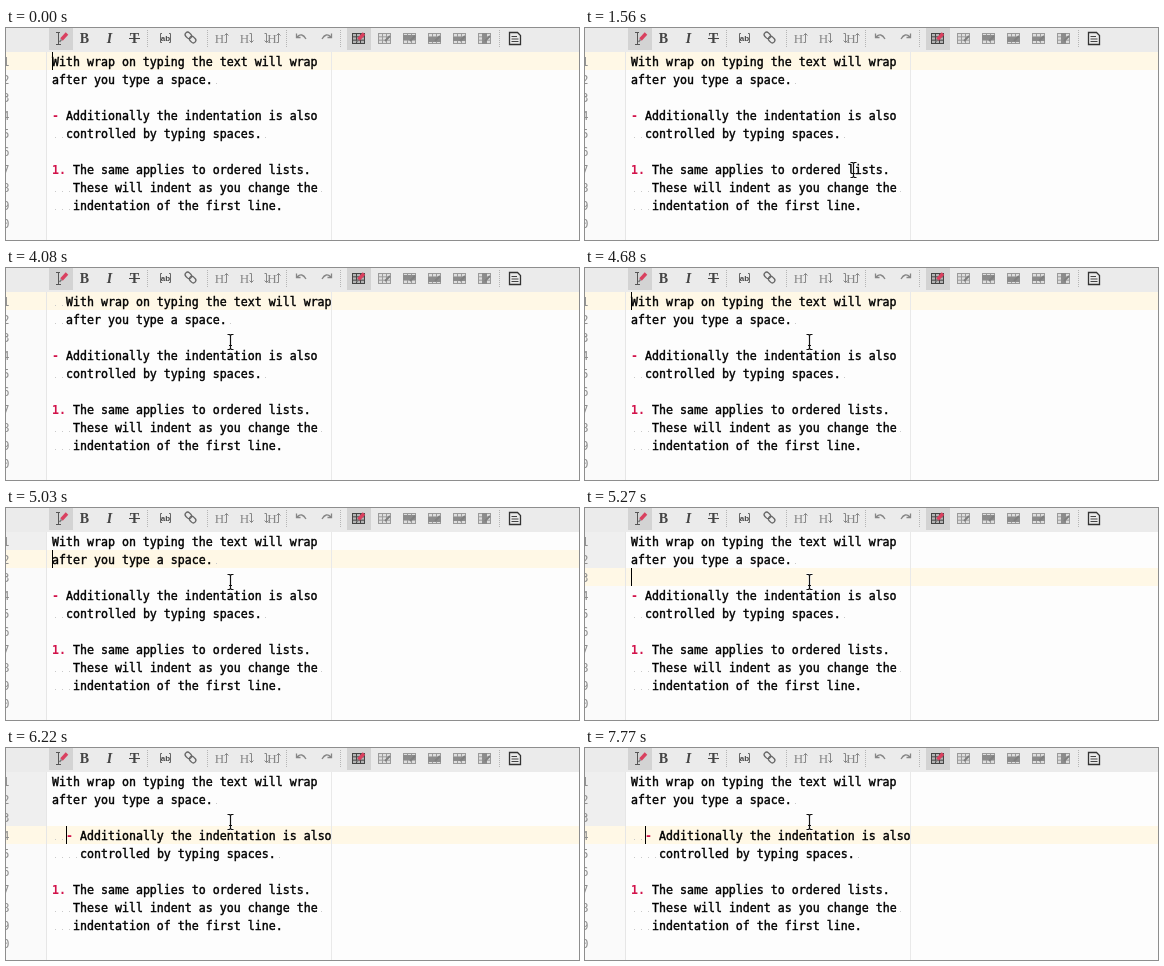
An HTML page with a canvas that plays this animation: 573x212 px, repeating every 8 s.

```html
<!DOCTYPE html>
<html lang="en">
<head>
<meta charset="utf-8">
<title>Wrap on typing</title>
<style>
  html, body { margin: 0; width: 100%; height: 100%; overflow: hidden; background: #fdfdfd; }
  canvas { display: block; }
</style>
</head>
<body>
<canvas id="stage" width="573" height="212"></canvas>
<script>
const ctx = document.getElementById('stage').getContext('2d');
const LOOP = 8000, LEFT = 46, CELL = 7, TOP = 24, ROW = 18;
const MONO = '11.627px "DejaVu Sans Mono", monospace';
const SANS = '"Liberation Sans", Arial, sans-serif';
const SERIF = '"Liberation Serif", serif';
const PINK = '#d2134b', DARK = '#444', GREY = '#868686';

// time, active row, paragraph indent, list indent, continuation indent, caret shown
const STATES = [
  [0, 0, 0, 0, 0, 1],
  [600, 0, 0, 0, 0, 0],
  [1080, 0, 0, 0, 0, 1],
  [1560, 0, 0, 0, 0, 0],
  [2040, 0, 0, 0, 0, 1],
  [2640, 0, 1, 0, 0, 1],
  [3240, 0, 2, 0, 0, 1],
  [4080, 0, 2, 0, 0, 0],
  [4320, 0, 1, 0, 0, 1],
  [4680, 0, 0, 0, 0, 1],
  [5030, 1, 0, 0, 0, 1],
  [5270, 2, 0, 0, 0, 1],
  [5380, 3, 0, 0, 0, 1],
  [5740, 3, 0, 1, 0, 1],
  [5860, 3, 0, 1, 1, 1],
  [6220, 3, 0, 2, 2, 1],
  [6940, 3, 0, 3, 3, 1],
  [7540, 3, 0, 3, 3, 0],
  [7770, 3, 0, 2, 2, 1]
];

function rect(x, y, w, h, color) {
  ctx.fillStyle = color;
  ctx.fillRect(x, y, w, h);
}

function text(s, x, y, font, color, align = 'left') {
  ctx.font = font;
  ctx.fillStyle = color;
  ctx.textAlign = align;
  ctx.fillText(s, x, y);
}

// Medium weight: a fill with a thin outline.
function code(s, x, y, color) {
  text(s, x, y, MONO, color);
  ctx.strokeStyle = color;
  ctx.lineWidth = 0.4;
  ctx.strokeText(s, x, y);
}

function path(d, color, width = 1) {
  ctx.strokeStyle = color;
  ctx.lineWidth = width;
  ctx.stroke(new Path2D(d));
}

function arrow(x, dir) {
  const tip = dir < 0 ? 5.5 : 14.5, tail = 20 - tip;
  path(`M${x - 2} ${tail}H${x}V${tip}M${x - 2} ${tip - 2 * dir}L${x} ${tip}L${x + 2} ${tip - 2 * dir}`, GREY);
}

function pen(x, y) {
  path(`M${x - 2.5} ${y + 3}L${x + 3} ${y - 3}`, '#d9405f', 3.4);
  path(`M${x - 4.5} ${y + 5.5}L${x - 2.5} ${y + 3}`, '#777', 1.5);
}

function grid(x, line, fill) {
  rect(x - 6, 5, 13, 11, fill);
  let d = '';
  for (let i = 0; i < 4; i++) {
    d += `M${x - 5.5 + i * 4} 5V16M${x - 6} ${5.5 + i * 3.33}H${x + 7}`;
  }
  path(d, line);
}

function table(x, kind) {
  grid(x, '#9a9a9a', '#dedede');
  if (kind === 1 || kind === 2) rect(x - 6, 5 + kind * 2, 13, 5, '#8c8c8c');
  if (kind === 3) rect(x - 6, 9, 13, 4, '#8c8c8c');
  if (kind === 4) rect(x - 2, 5, 5, 11, '#8c8c8c');
  path(`M${x + 1} 13L${x + 6} 8`, '#808080', 2);
}

function heading(x, arrows) {
  text('H', x, 15, `13px ${SERIF}`, GREY, 'center');
  arrows.forEach(([dx, dir]) => arrow(x + dx, dir));
}

function toolbar() {
  rect(0, 0, 573, TOP, '#ebebeb');
  rect(43, 0, 24, 22, '#d3d3d3');
  rect(341, 0, 24, 22, '#d3d3d3');

  path('M50 4.5H54M52.5 4.5V16M50 16.5H55', '#555');
  pen(58, 8.5);
  text('B', 78.5, 15, `bold 14px ${SERIF}`, DARK, 'center');
  text('I', 103.5, 15, `italic bold 14px ${SERIF}`, DARK, 'center');
  text('T', 128.5, 15, `bold 14px ${SERIF}`, DARK, 'center');
  path('M123 10.5H134', DARK);

  path('M156 5.5H154.5V14.5H156M163 5.5H164.5V14.5H163', '#666');
  text('ab', 159.5, 13, `bold 8px ${SANS}`, DARK, 'center');
  ctx.save();
  ctx.translate(184.5, 9.5);
  ctx.rotate(Math.PI / 4);
  ctx.strokeStyle = '#666';
  ctx.lineWidth = 1.3;
  for (const x of [-6.5, -0.5]) {
    ctx.beginPath();
    ctx.roundRect(x, -2.5, 7, 5, 2.5);
    ctx.stroke();
  }
  ctx.restore();

  heading(213.5, [[7, -1]]);
  heading(238.5, [[7, 1]]);
  heading(266, [[-5.5, 1], [6.5, -1]]);
  path('M291 9Q296 4 300 11M290.5 5.5V9.5H294.5', GREY, 1.3);
  path('M325 9Q320 4 316 11M325.5 5.5V9.5H321.5', GREY, 1.3);

  grid(352, '#444', '#b5b5b5');
  pen(355, 8.5);
  [378, 403, 428, 453, 478].forEach(table);

  path('M503.5 4.5H511.5L514.5 7.5V16.5H503.5Z', '#333', 1.3);
  path('M505.5 8.5H511M505.5 11H512.5M505.5 13.5H512.5', '#444');

  for (const x of [141, 201, 280, 334, 493]) {
    for (let y = 2; y < 20; y += 2) rect(x, y, 1, 1, '#b5b5b5');
  }
}

function documentLines(para, list, cont) {
  const a = ' '.repeat(para), b = ' '.repeat(list), c = ' '.repeat(cont + 2);
  const wrapped = list > 2;
  return [
    a + 'With wrap on typing the text will wrap',
    a + 'after you type a space. ',
    '',
    b + '- Additionally the indentation is ' + (wrapped ? '' : 'also'),
    c + (wrapped ? 'also ' : '') + 'controlled by typing spaces. ',
    '',
    '1. The same applies to ordered lists.',
    '   These will indent as you change the ',
    '   indentation of the first line.'
  ];
}

function drawLine(line, row) {
  const y = TOP + row * ROW + 14;
  const lead = line.length - line.trimStart().length;
  const end = line.trimEnd().length;
  for (let i = 0; i < line.length; i++) {
    if (i < lead || i >= end) rect(LEFT + i * CELL + 3, y - 1, 1, 1, '#c9c9c9');
  }
  const body = line.trim();
  const mark = (body.match(/^(-|1\.)/) || [''])[0];
  const x = LEFT + lead * CELL;
  text(mark, x, y, `bold ${MONO}`, PINK);
  code(body.slice(mark.length), x + mark.length * CELL, y, '#000');
}

function pointer(t) {
  if (t < 1440) return;
  const step = Math.min(5, Math.floor((t - 1440) / 120));
  const left = (1 - step / 5) ** 2;
  const x = Math.round(224 + 69 * left) + 0.5;
  const y = Math.round(74 + 107 * left);
  const beam = `M${x - 3} ${y - 7.5}H${x - 1}L${x} ${y - 6.5}L${x + 1} ${y - 7.5}H${x + 3}` +
    `M${x} ${y - 7}V${y + 7}M${x - 3} ${y + 7.5}H${x - 1}L${x} ${y + 6.5}L${x + 1} ${y + 7.5}H${x + 3}` +
    `M${x - 1.5} ${y + 3.5}H${x + 1.5}`;
  path(beam, '#fff', 2.5);
  path(beam, '#111', 1.2);
}

function draw(t) {
  const [, active, para, list, cont, caret] = STATES.findLast(s => s[0] <= t);
  const top = TOP + active * ROW;
  rect(0, 0, 573, 212, '#fdfdfd');
  rect(0, TOP, 40, 188, '#fafafa');
  rect(0, TOP, 40, active * ROW, '#efefef');
  rect(0, top, 573, ROW, '#fff8e6');
  rect(40, TOP, 1, 188, '#e6e6e6');
  rect(325, TOP, 1, 188, '#e9e9e9');

  for (let i = 0; i < 10; i++) {
    text(String((i + 1) % 10), -3.5, TOP + i * ROW + 14, MONO, '#8f8f8f');
  }
  documentLines(para, list, cont).forEach(drawLine);
  if (caret) {
    const col = active === 3 ? list : para;
    rect(LEFT + col * CELL, top, 1, ROW, '#000');
  }
  toolbar();
  pointer(t);
}

function frame(now) {
  draw(now % LOOP);
  requestAnimationFrame(frame);
}
draw(0);
requestAnimationFrame(frame);
</script>
</body>
</html>
```
